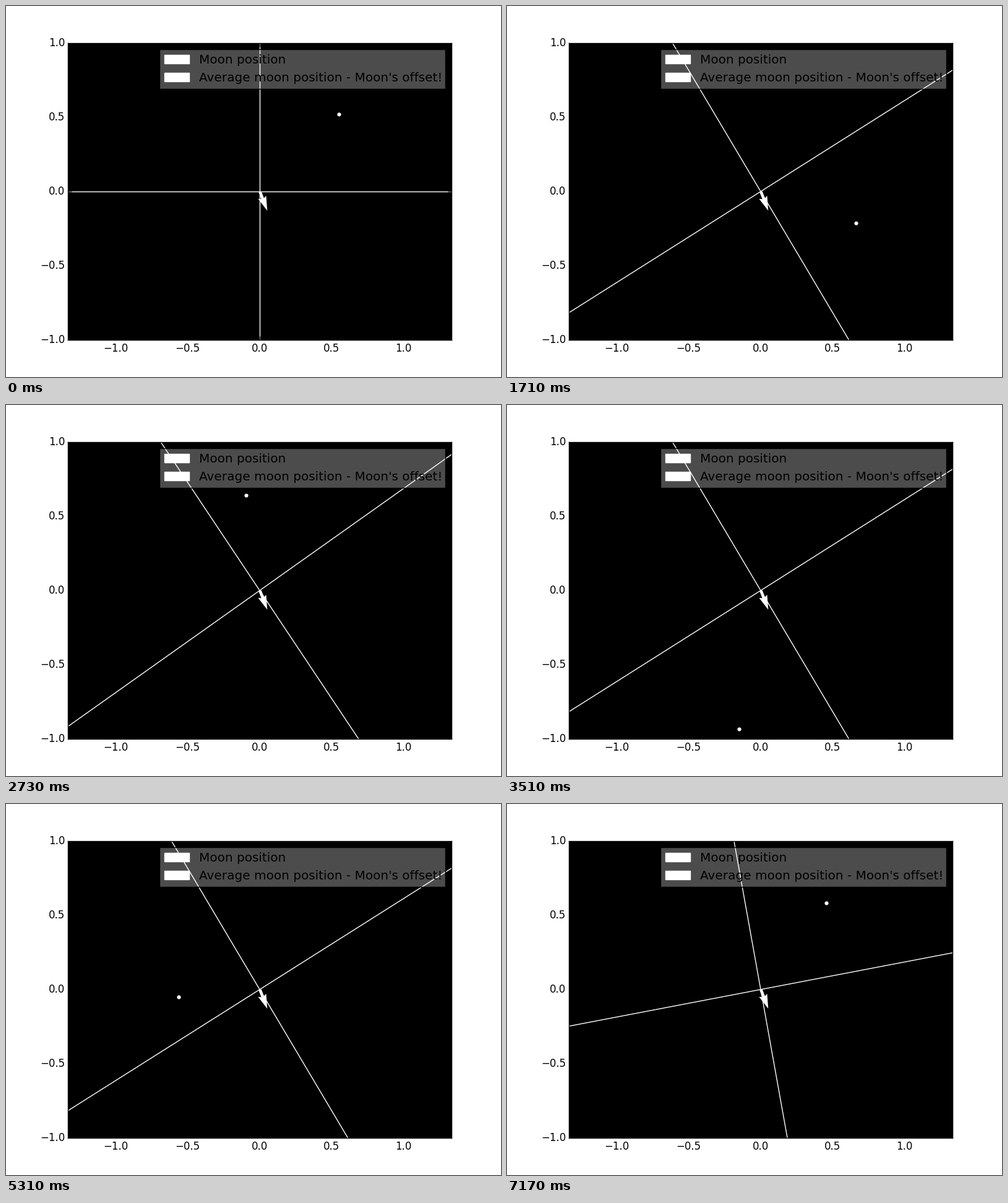
Animation of 800x600 px, one loop 7200 ms. Source, as a matplotlib script:

```python
import matplotlib.pyplot as plt
import numpy as np
from matplotlib.animation import FuncAnimation
from matplotlib.patches import Patch

FRAMES = 240
INTERVAL = 30

OFFSET = 0.05 - 0.13j   # mean moon position
ORBIT = 0.4 + 0.6j      # turns 5 times per loop
WOBBLE = 0.1 + 0.05j    # turns 7 times per loop, with the cross
ARM = 2.0

plt.style.use("classic")
plt.rcParams["font.family"] = "DejaVu Sans"

fig = plt.figure(figsize=(8, 6), dpi=100, facecolor="white")
ax = fig.add_axes([0.125, 0.1, 0.775, 0.8], facecolor="black")
ax.set_xlim(-4 / 3, 4 / 3)
ax.set_ylim(-1, 1)
ticks = np.arange(-1, 1.1, 0.5)
ax.set_xticks(ticks)
ax.set_yticks(ticks)
ax.tick_params(pad=3.3)

arms = [ax.plot([], [], color="white", lw=1)[0] for _ in range(2)]
moon = ax.scatter([0], [0], s=20, color="white", linewidths=0, zorder=3)
ax.quiver(0, 0, OFFSET.real, OFFSET.imag, color="white", units="xy", scale=1)

labels = ["Moon position", "Average moon position - Moon's offset!"]
legend = ax.legend(
    handles=[Patch(color="white", label=text) for text in labels],
    loc="upper right", facecolor=(1, 1, 1, 0.3), edgecolor="black",
    handletextpad=0.65)
# Let the text reach slightly into the right padding.
for text in legend.get_texts():
    text.set_x(3)


def turn(frame, revs):
    """Clockwise rotation after `frame` steps at `revs` turns per loop."""
    return np.exp(-2j * np.pi * revs * frame / FRAMES)


def update(frame):
    spin = turn(frame, 7)
    for line, axis in zip(arms, (1, 1j)):
        tip = ARM * axis * spin
        line.set_data([-tip.real, tip.real], [-tip.imag, tip.imag])
    pos = OFFSET + ORBIT * turn(frame, 5) + WOBBLE * spin
    moon.set_offsets([[pos.real, pos.imag]])
    return [*arms, moon]


anim = FuncAnimation(fig, update, frames=FRAMES, interval=INTERVAL, repeat=True)
plt.show()
```
